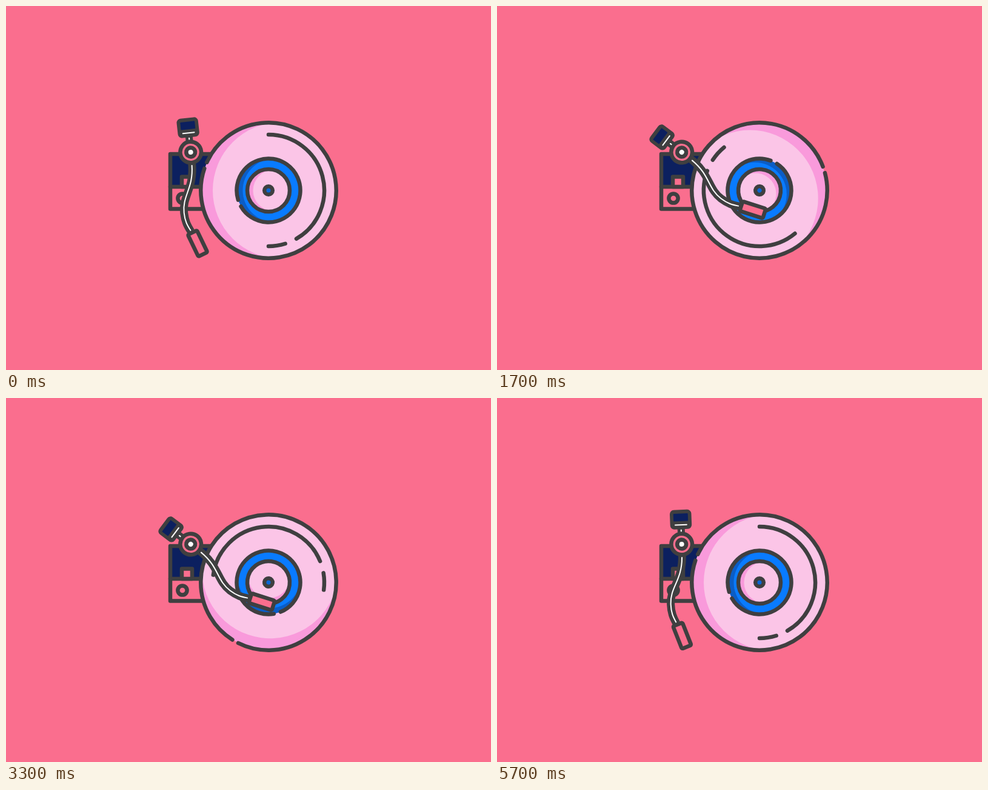
These frames come from a looping animation (800x600 px, 5800 ms). An HTML page:

```html
<!DOCTYPE html>
<html lang="en">
<head>
<meta charset="utf-8">
<title>Turntable</title>
<style>
  html, body { margin: 0; width: 100%; height: 100%; overflow: hidden; background: #fa6e8e; }
  svg { display: block; width: 100vw; height: 100vh; }
  .line { stroke: #3f3f40; stroke-width: 6.5; stroke-linecap: round; stroke-linejoin: round; fill: none; }
  .bg { fill: #fa6e8e; }
  .dark { fill: #3f3f40; }
  .navy { fill: #0c205f; }
  .light { fill: #fbc5e7; }
  .shade { fill: #f99adb; }
  .blue { fill: #097bff; }
  .deep { fill: #0b5dc6; }
  .shine { stroke: #fff; stroke-width: 2; stroke-linecap: round; fill: none; }
</style>
</head>
<body>
<svg viewBox="0 0 800 600">
  <defs>
    <clipPath id="disc"><circle r="111.5"/></clipPath>
    <clipPath id="ring"><circle r="52.5"/></clipPath>
    <clipPath id="label"><circle r="35"/></clipPath>
  </defs>

  <g id="base">
    <rect class="navy" x="271" y="244" width="80" height="54"/>
    <rect class="line" x="271" y="244" width="80" height="90.5"/>
    <path class="line" d="M271 298H350"/>
    <rect class="line bg" x="290" y="281.5" width="17" height="16.5" style="fill:#fa6e8e"/>
    <circle class="line" cx="291" cy="317" r="7.6"/>
  </g>

  <g id="record">
    <g clip-path="url(#disc)">
      <circle class="shade" r="111.5"/>
      <circle class="light" cx="20.5" r="112.5"/>
    </g>
    <g clip-path="url(#ring)">
      <circle class="deep" r="52.5"/>
      <circle class="blue" cx="10" r="52.5"/>
    </g>
    <g clip-path="url(#label)">
      <circle class="shade" r="35"/>
      <circle class="light" cx="8.5" r="34"/>
    </g>
    <circle class="line" r="35"/>
    <circle class="line" r="6.8" style="fill:#0b66d6"/>
  </g>

  <g id="arm">
    <path class="line" d="M0 -28V-15" style="stroke-width:12;stroke-linecap:butt"/>
    <path class="shine" d="M0 -23.5V-21"/>
    <rect class="line dark" x="-14.5" y="-53.5" width="29" height="25.5" rx="3.5" style="fill:#3f3f40"/>
    <rect class="navy" x="-12" y="-50.5" width="24" height="12.5" rx="1"/>
    <path class="shine" d="M-9.5 -32H9.5"/>
    <path class="line" id="tube" d="M0 16C0 60 -22 70 -22 98C-22 112 -19 120 -14 130" style="stroke-width:13;stroke-linecap:butt"/>
    <path class="shine" d="M-.5 22C-2 60 -22 70 -22 98C-22 112 -19 119 -14.5 128"/>
    <g transform="translate(-5.3 150.7) rotate(70.7)">
      <rect class="line" x="-20" y="-8.3" width="40" height="16.6" rx="2" style="fill:#fa6e8e"/>
    </g>
    <circle class="line" r="17.3" style="fill:#fa6e8e"/>
    <circle class="dark" r="10.7"/>
    <circle r="4" fill="#fff"/>
  </g>
</svg>
<script>
  const LOOP = 5800, STEP = 100, ARM_IN = -53;
  const record = document.getElementById('record');
  const arm = document.getElementById('arm');

  const clamp = x => Math.min(1, Math.max(0, x));
  const smooth = s => s * s * (3 - 2 * s);

  // Flat at both ends; x1 and x2 set how far each end reaches.
  function ease(x, x1, x2) {
    x = clamp(x);
    let lo = 0, hi = 1;
    for (let i = 0; i < 30; i++) {
      const s = (lo + hi) / 2, r = 1 - s;
      if (3 * r * r * s * x1 + 3 * r * s * s * x2 + s * s * s < x) lo = s;
      else hi = s;
    }
    return smooth((lo + hi) / 2);
  }

  function addArc(radius, from, to) {
    const at = deg => {
      const a = deg * Math.PI / 180;
      return `${radius * Math.cos(a)} ${radius * Math.sin(a)}`;
    };
    const path = document.createElementNS('http://www.w3.org/2000/svg', 'path');
    path.setAttribute('class', 'line');
    path.setAttribute('d', `M${at(from)}A${radius} ${radius} 0 ${to - from > 180 ? 1 : 0} 1 ${at(to)}`);
    record.append(path);
  }

  addArc(111.7, 204.5, 558.9);
  addArc(52.5, 162.6, 510);
  addArc(92, -90, 60);
  addArc(92, 72.5, 90);

  function armAngle(t) {
    return t < 5000
      ? ARM_IN * ease((t + 135) / 860, 1 / 3, 0.13)
      : ARM_IN * (1 - smooth(clamp((t - 5000) / 800)));
  }

  const spin = t => 720 * ease((t - 913) / 4128, 1 / 3, 0.13);

  function draw(t) {
    record.setAttribute('transform', `translate(433 304) rotate(${spin(t)})`);
    arm.setAttribute('transform', `translate(304.7 241) rotate(${armAngle(t)})`);
  }

  const start = performance.now();
  function tick() {
    const t = (performance.now() - start) % LOOP;
    draw(Math.floor(t / STEP) * STEP);
    requestAnimationFrame(tick);
  }
  tick();
</script>
</body>
</html>
```
